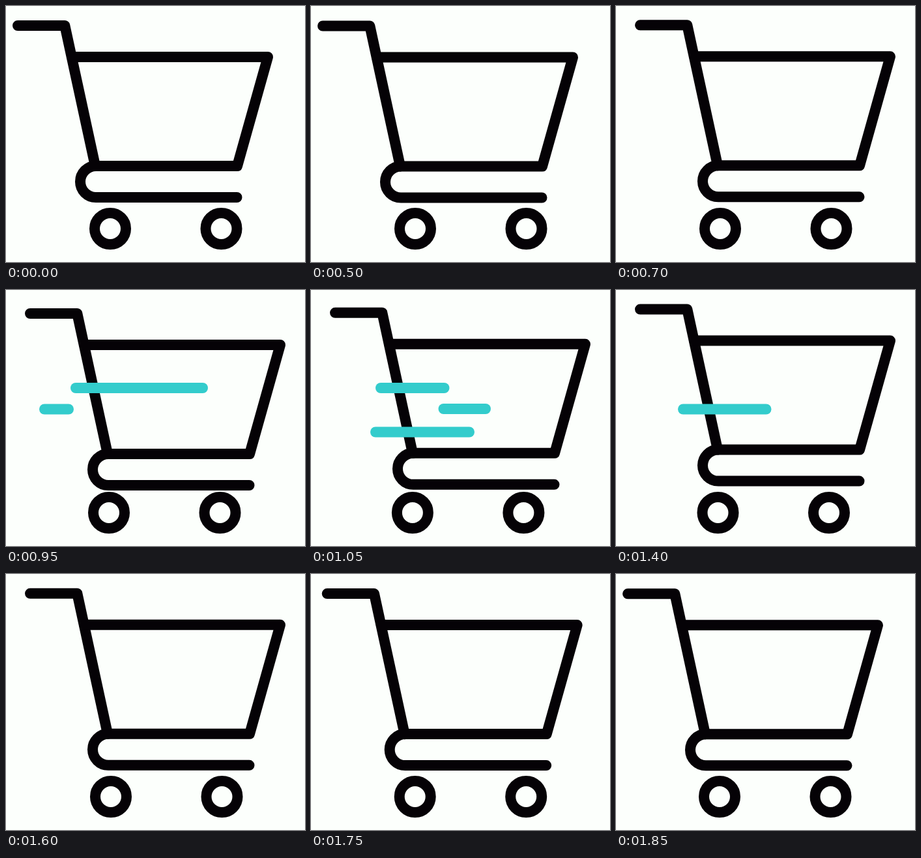
An HTML page for the animation above (1900 ms loop, 459x392 px).

```html
<!DOCTYPE html>
<html lang="en">
<head>
<meta charset="utf-8">
<title>Shopping cart</title>
<style>
  html, body { margin: 0; width: 100%; height: 100%; overflow: hidden; background: #fcfffc; }
  svg { display: block; width: 459px; height: 392px; }
  path, circle, line { fill: none; stroke: #050206; stroke-width: 16; stroke-linecap: round; stroke-linejoin: round; }
  line { stroke: #33cccc; }
</style>
</head>
<body>
<svg viewBox="0 0 459 392">
  <g id="wheels">
    <circle cx="160" cy="341" r="24"/>
    <circle cx="330.5" cy="341" r="24"/>
  </g>
  <g id="body">
    <path d="M18 30H90.300L137 245"/>
    <path d="M101 78H402L355 245H138A24 24 0 0 0 138 293H354.500"/>
  </g>
  <g id="streaks"></g>
</svg>
<script>
const LOOP = 1900, HOLD = 500, STEP = 50;

// Rows of [time, value]
const bodyX = [[500, 0], [700, 19], [1600, 19], [1850, 0]];
const bodyY = [[0, 0], [450, 0], [500, 0.5], [700, -0.7], [950, 6], [1200, 2.7], [1450, -0.8], [1600, -0.2], [1850, 0.3]];
const wheelX = [[500, 0], [700, 0], [950, -2], [1200, -8], [1600, 1], [1850, -1]];

// The head runs right to left, then the tail catches up
const streaks = [
  { y: 150, from: 302, to: 107, head: [750, 950], tail: [950, 1150] },
  { y: 182.5, from: 207, to: 59, head: [700, 850], tail: [800, 1000] },
  { y: 217.5, from: 243, to: 27, head: [950, 1100], tail: [1100, 1300] },
  { y: 182, from: 268, to: 139, head: [1000, 1100], tail: [1100, 1250] },
  { y: 182.5, from: 358, to: 103, head: [1150, 1300], tail: [1300, 1500] }
];

const $ = id => document.getElementById(id);
const progress = (t, [a, b]) => Math.min(1, Math.max(0, (t - a) / (b - a)));
const smooth = p => p * p * (3 - 2 * p);

function sample(keys, t) {
  if (t <= keys[0][0]) return keys[0][1];
  for (let i = 1; i < keys.length; i++) {
    const [t0, v0] = keys[i - 1], [t1, v1] = keys[i];
    if (t <= t1) return v0 + (v1 - v0) * smooth(progress(t, [t0, t1]));
  }
  return keys[keys.length - 1][1];
}

for (const s of streaks) {
  s.el = document.createElementNS("http://www.w3.org/2000/svg", "line");
  s.el.setAttribute("y1", s.y);
  s.el.setAttribute("y2", s.y);
  $("streaks").append(s.el);
}

function draw(time) {
  const now = time % LOOP;
  const t = now < HOLD ? 0 : Math.floor(now / STEP) * STEP;
  $("body").setAttribute("transform", `translate(${sample(bodyX, t)} ${sample(bodyY, t)})`);
  $("wheels").setAttribute("transform", `translate(${sample(wheelX, t)} 0)`);
  for (const s of streaks) {
    const at = span => s.from + (s.to - s.from) * progress(t, span);
    s.el.setAttribute("x1", at(s.head));
    s.el.setAttribute("x2", at(s.tail));
    s.el.style.display = t > s.head[0] && t < s.tail[1] ? "" : "none";
  }
}

const start = performance.now();
function tick() {
  draw(performance.now() - start);
  requestAnimationFrame(tick);
}
tick();
</script>
</body>
</html>
```
